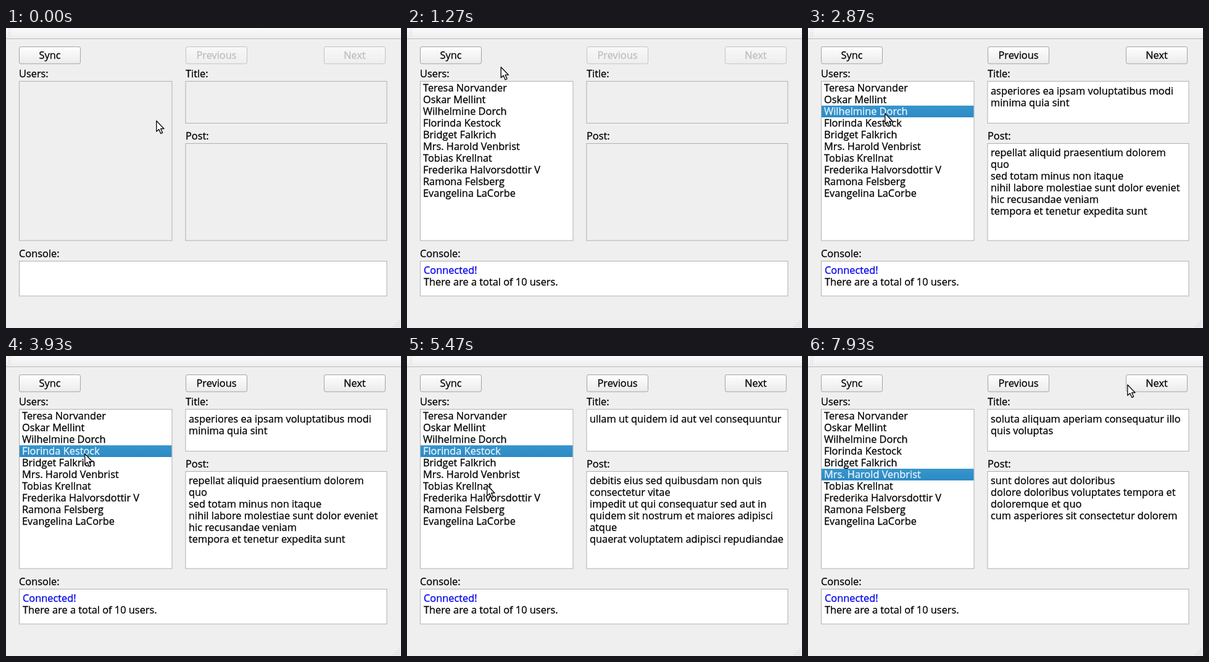
Recreate the animation shown at these times as an HTML page. Size 640x487 px, loop 8 s.

```html
<!DOCTYPE html>
<html lang="en">
<head>
<meta charset="utf-8">
<title>User posts</title>
<style>
  html, body { margin: 0; width: 100%; height: 100%; overflow: hidden; background: #efefef; }
  svg { display: block; width: 640px; height: 487px; color: #000; }
  text {
    font: 16.38px "Open Sans", "Noto Sans", sans-serif; white-space: pre;
    fill: currentColor; stroke: currentColor; stroke-width: .3px;
  }
  .pane { stroke: #b0b0b0; }
</style>
</head>
<body>
<svg id="stage" viewBox="0 0 640 487">
  <defs>
    <linearGradient id="bar" x2="0" y2="1"><stop stop-color="#fafafa"/><stop offset="1" stop-color="#ededed"/></linearGradient>
    <linearGradient id="raised" x2="0" y2="1"><stop stop-color="#fefefe"/><stop offset="1" stop-color="#ebebeb"/></linearGradient>
    <linearGradient id="faded" x2="0" y2="1"><stop stop-color="#f8f8f8"/><stop offset="1" stop-color="#eeeeee"/></linearGradient>
    <linearGradient id="pressed" x2="0" y2="1"><stop stop-color="#d2d2d2"/><stop offset="1" stop-color="#dedede"/></linearGradient>
    <linearGradient id="picked" x2="0" y2="1"><stop stop-color="#3795cd"/><stop offset="1" stop-color="#2d8ac3"/></linearGradient>
  </defs>
</svg>
<script>
const STEP = 1000 / 15, LOOP = 8000, LINE = 19;
const stage = document.getElementById("stage");

const users = ["Teresa Norvander", "Oskar Mellint", "Wilhelmine Dorch", "Florinda Kestock",
  "Bridget Falkrich", "Mrs. Harold Venbrist", "Tobias Krellnat",
  "Frederika Halvorsdottir V", "Ramona Felsberg", "Evangelina LaCorbe"];

const posts = [
  { from: 43,
    title: ["asperiores ea ipsam voluptatibus modi", "minima quia sint"],
    body: ["repellat aliquid praesentium dolorem", "quo", "sed totam minus non itaque",
      "nihil labore molestiae sunt dolor eveniet", "hic recusandae veniam",
      "tempora et tenetur expedita sunt"] },
  { from: 70,
    title: ["ullam ut quidem id aut vel consequuntur"],
    body: ["debitis eius sed quibusdam non quis", "consectetur vitae",
      "impedit ut qui consequatur sed aut in", "quidem sit nostrum et maiores adipisci",
      "atque", "quaerat voluptatem adipisci repudiandae"] },
  { from: 107,
    title: ["soluta aliquam aperiam consequatur illo", "quis voluptas"],
    body: ["sunt dolores aut doloribus", "dolore doloribus voluptates tempora et",
      "doloremque et quo", "cum asperiores sit consectetur dolorem"] }
];

// All moments are counted in steps of 1/15 s.
const PRESS = 13, LOADED = 15, ENABLED = 35;
const picks = [{ from: 34, row: 2 }, { from: 58, row: 3 }, { from: 88, row: 5 }];

// Pointer path: step, x, y
const path = [
  [0, 243, 150], [9, 86, 39], [15, 86, 39], [22, 194, 78], [25, 194, 78],
  [26, 190, 82], [31, 124, 138], [50, 124, 138], [51, 134, 158], [52, 148, 176],
  [53, 127, 158], [72, 127, 158], [75, 148, 188], [78, 135, 214], [81, 135, 214],
  [82, 129, 209], [86, 120, 184], [104, 120, 184], [105, 126, 182], [106, 126, 182],
  [107, 122, 189], [108, 120, 195], [111, 120, 195], [119, 517, 46], [120, 517, 46]
];

function set(el, attrs) {
  for (const key in attrs) el.setAttribute(key, attrs[key]);
  return el;
}

function add(tag, attrs, parent = stage) {
  return parent.appendChild(set(document.createElementNS("http://www.w3.org/2000/svg", tag), attrs));
}

function rect(x, y, width, height, attrs) {
  return add("rect", { x, y, width, height, ...attrs });
}

function label(x, y, words, attrs, parent) {
  const el = add("text", { x, y, ...attrs }, parent);
  el.textContent = words;
  return el;
}

function lines(x, y, list, parent) {
  return list.map((words, i) => label(x, y + i * LINE, words, {}, parent));
}

function pane(x, y, width, height, fill = "#efefef") {
  return rect(x + .5, y + .5, width, height, { class: "pane", fill });
}

function button(x, words) {
  const box = rect(x + .5, 30.5, 99, 27.5, { rx: 2.5 });
  const text = label(x + 50, 50, words, { "text-anchor": "middle" });
  return state => {
    const off = state === "faded";
    set(box, { fill: `url(#${state})`, stroke: off ? "#c3c3c3" : "#a3a3a3" });
    set(text, { color: off ? "#bdbdbd" : "#000" });
  };
}

function show(el, on) {
  el.style.display = on ? "" : "none";
}

function latest(list, step) {
  return list.filter(item => item.from <= step).pop();
}

// Window frame: toolbar edge, handle and resize grip
rect(0, 0, 640, 17, { fill: "url(#bar)" });
rect(0, 17, 640, 1, { fill: "#b8b8b8" });
for (let y = 1; y < 16; y += 3)
  for (const x of [4, 7]) rect(x, y, 1, 1, { fill: "#c2c2c2" });
for (let i = 0; i < 4; i++)
  for (let j = 3 - i; j < 4; j++) rect(627 + j * 3, 475 + i * 3, 1, 1, { fill: "#b5b5b5" });

const sync = button(21, "Sync");
const previous = button(291, "Previous");
const next = button(515, "Next");

label(21, 79.5, "Users:");
label(291, 79.5, "Title:");
label(291, 180.5, "Post:");
label(21, 371.5, "Console:");

const userPane = pane(21, 86, 247.5, 258.5);
const postPanes = [pane(290.5, 86, 326, 68), pane(290.5, 187, 326, 157.5)];
pane(21, 378, 595.5, 56.5, "#fff");

const loaded = add("g", {});
const picked = add("rect", { x: 22, width: 246.5, height: LINE, fill: "url(#picked)" }, loaded);
const rows = lines(26, 103, users, loaded);
label(27, 399, "Connected!", { color: "#0000f0" }, loaded);
label(27, 418, "There are a total of 10 users.", {}, loaded);

for (const post of posts) {
  post.group = add("g", {});
  lines(296, 107.5, post.title, post.group);
  lines(296, 208, post.body, post.group);
}

const pointer = add("path", {
  d: "M.8 .8V18L4.8 14.5L7.7 21.3L10.6 20L7.7 13.5H13Z",
  fill: "#fff", stroke: "#111", "stroke-width": 1.4, "stroke-linejoin": "round"
});

function pointerAt(step) {
  const i = path.findIndex(key => key[0] > step);
  const [t0, x0, y0] = path[i - 1], [t1, x1, y1] = path[i];
  const u = (step - t0) / (t1 - t0), e = u * u * (3 - 2 * u);
  return [x0 + (x1 - x0) * e, y0 + (y1 - y0) * e];
}

function draw(ms) {
  const step = Math.floor((ms % LOOP + 4) / STEP) % 120;
  const ready = step >= LOADED, enabled = step >= ENABLED;
  const pick = latest(picks, step), post = latest(posts, step);

  sync(step >= PRESS && !ready ? "pressed" : "raised");
  previous(enabled ? "raised" : "faded");
  next(enabled ? "raised" : "faded");

  show(loaded, ready);
  set(userPane, { fill: ready ? "#fff" : "#efefef" });
  postPanes.forEach(el => set(el, { fill: enabled ? "#fff" : "#efefef" }));

  show(picked, pick);
  if (pick) set(picked, { y: 88 + pick.row * LINE });
  rows.forEach((el, i) => set(el, { color: pick && pick.row === i ? "#e9f5fd" : "#000" }));
  posts.forEach(p => show(p.group, p === post));

  set(pointer, { transform: `translate(${pointerAt(step)})` });
}

const start = performance.now();
function tick() {
  draw(performance.now() - start);
  requestAnimationFrame(tick);
}
tick();
</script>
</body>
</html>
```
